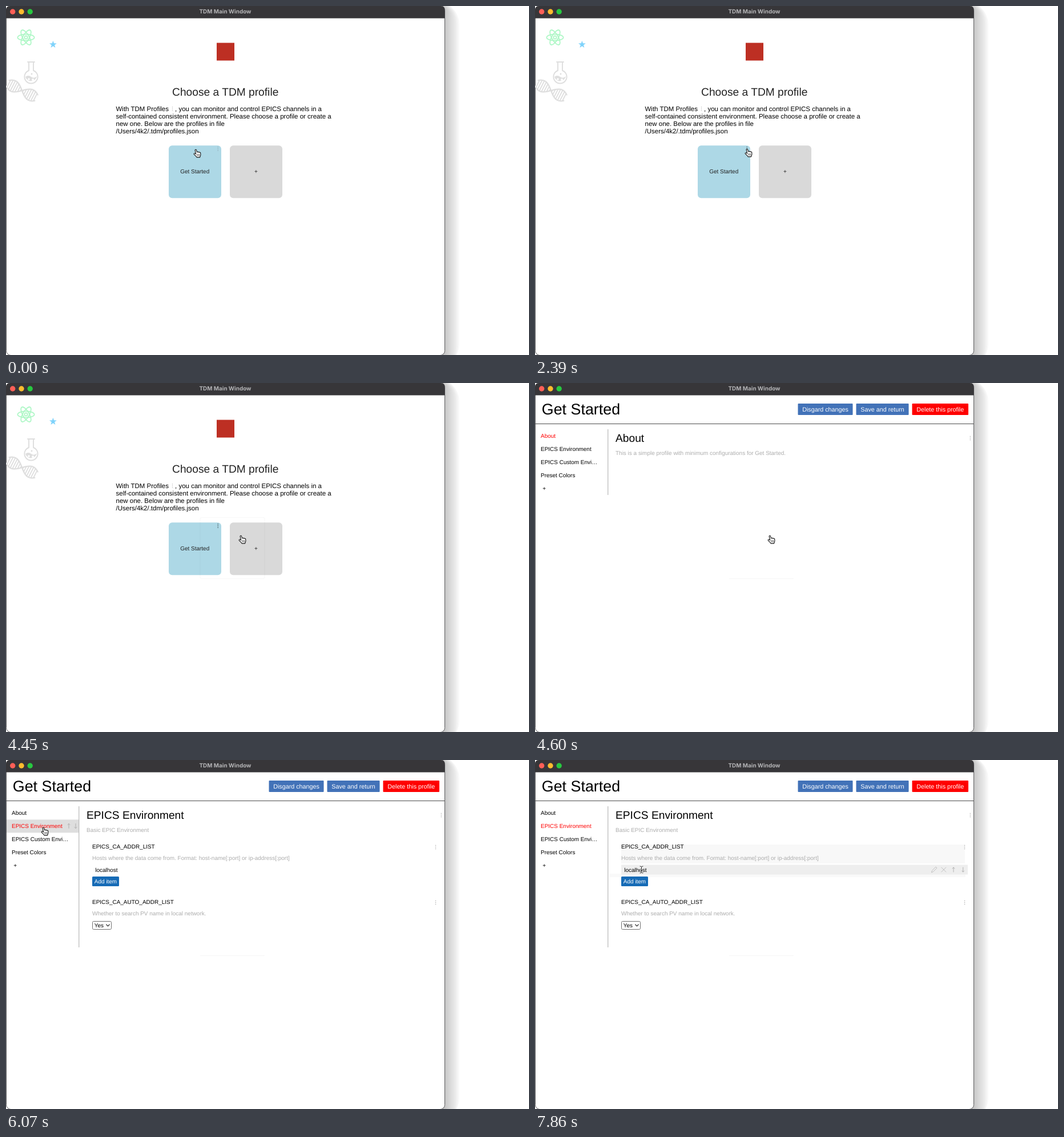
An HTML page that plays this animation: 916 by 611 pixels, repeating every 8 s.

```html
<!DOCTYPE html>
<html lang="en">
<head>
<meta charset="utf-8">
<title>TDM Main Window</title>
<style>
  html, body { margin: 0; width: 100%; height: 100%; overflow: hidden; background: #fff; }
  svg { display: block; width: 916px; height: 611px; }
  text { font-family: "Liberation Sans", Arial, sans-serif; font-size: 9.97px; text-rendering: geometricPrecision; white-space: pre; }
  .h1 { font-size: 26.85px; }
  .h2 { font-size: 19.19px; }
  .body { font-size: 11.51px; }
  .btn { font-size: 10.74px; fill: #fff; }
  .hint { fill: #adadad; }
  .mac { font-family: Inter, Roboto, sans-serif; font-size: 9.5px; fill: #f2f2f2; }
  .title { font-size: 9.9px; font-weight: 700; fill: #b4b4b6; }
  .mid { text-anchor: middle; }
  .line { fill: none; stroke-linecap: round; stroke-linejoin: round; }
</style>
</head>
<body>
<svg id="stage" viewBox="0 0 916 611" xmlns="http://www.w3.org/2000/svg"></svg>
<script>
const LOOP = 8000;

const text = (x, y, s, cls = '', more = '') => `<text x="${x}" y="${y}" class="${cls}" ${more}>${s}</text>`;
const rect = (x, y, w, h, fill, rx = 0, more = '') =>
  `<rect x="${x}" y="${y}" width="${w}" height="${h}" rx="${rx}" fill="${fill}" ${more}/>`;
const circle = (x, y, r, fill) => `<circle cx="${x}" cy="${y}" r="${r}" fill="${fill}"/>`;
const line = (d, color, w = 1, more = '') => `<path class="line" d="${d}" stroke="${color}" stroke-width="${w}" ${more}/>`;
const dots = (x, y, fill) => [-3, 0, 3].map(d => circle(x, y + d, .75, fill)).join('');
const group = (id, body, more = '') => `<g id="${id}" ${more}>${body}</g>`;
const range = n => [...Array(n).keys()];

const shadow = () => range(9).map(k =>
  rect(600, -2 - k * .75, 170.5 + k * 3 - 0.5, 640, '#000', 10 + k * 3.75, 'opacity=".026"')).join('');

const atom = () => [0, 60, 120].map(a =>
  `<ellipse rx="14.6" ry="5.6" transform="translate(35 55) rotate(${a})" fill="none" stroke="#aef7c6" stroke-width="1.8"/>`).join('') +
  `<circle cx="35" cy="55" r="2.6" fill="none" stroke="#aef7c6" stroke-width="1.8"/>`;

const star = () => `<path fill="#7fd3fb" d="M${range(10).map(i => {
  const a = i * Math.PI / 5 - Math.PI / 2, r = i % 2 ? 2.7 : 6.8;
  return (82.4 + r * Math.cos(a)).toFixed(2) + ' ' + (67.5 + r * Math.sin(a)).toFixed(2);
}).join('L')}Z"/>`;

const flask = () =>
  line('M38 98H50M40 98.500V113A11.600 11.600 0 1 0 48 113V98.500', '#dedede', 1.9) +
  `<path d="M34 124Q39 120 44 124T54 123A10.300 10.300 0 0 1 34 124Z" fill="#dedede"/>` +
  circle(40, 128, 1.8, '#fff') + circle(47, 129, 2, '#fff') + circle(45, 119, 1.4, '#dedede');

const dna = () => {
  const y = x => 10 * Math.sin(x * Math.PI / 35);
  const strand = s => 'M' + range(29).map(i => `${i * 2 - 28} ${(s * y(i * 2 - 28)).toFixed(2)}`).join('L');
  const rungs = range(14).map(i => i * 4 - 26).map(x => `M${x} ${-y(x)}L${x} ${y(x)}`).join('');
  return `<g transform="translate(28 148) rotate(27)">` +
    line(strand(1), '#dedede', 2.2) + line(strand(-1), '#dedede', 2.2) + line(rungs, '#dedede', 1.8) + '</g>';
};

const arrow = (x, y, s) => line(`M${x} ${y - 4}V${y + 4}M${x - 2} ${y - 2 * s}L${x} ${y - 4 * s}L${x + 2} ${y - 2 * s}`, '#ababab', .9);
const arrows = (x1, x2, y) => arrow(x1, y, 1) + arrow(x2, y, -1);
const button = (x, w, fill, s) => rect(x, 36, w, 20, fill, 1) + text(x + w / 2, 49.6, s, 'btn mid');

const chooser = () =>
  atom() + star() + flask() + dna() +
  rect(369, 64.5, 31, 31, '#bd2f23') +
  text(384.2, 157, 'Choose a TDM profile', 'h2 mid', 'fill="#222"') +
  text(192.5, 183.6, 'With TDM Profiles', 'body') + dots(291.5, 180, '#bbb') +
  text(296, 183.6, ', you can monitor and control EPICS channels in a', 'body') +
  ['self-contained consistent environment. Please choose a profile or create a',
   'new one. Below are the profiles in file',
   '/Users/4k2/.tdm/profiles.json'].map((s, i) => text(192.5, 196.6 + i * 13, s, 'body')).join('') +
  rect(285, 244.3, 92, 92, '#add8e6', 6) + rect(392, 244.3, 92, 92, '#d9d9d9', 6) +
  text(330.7, 293.3, 'Get Started', 'mid', 'fill="#222"') + text(438, 293.3, '+', 'mid', 'fill="#222"') +
  group('dotsDim', dots(371.2, 250, '#8fa9b3')) + group('dotsOn', dots(371.2, 250, '#2c3a40'));

const menu = () =>
  rect(354, 239.500, 86, 93, '#555c5e', 5, 'stroke="#8b8f90" stroke-width="1" style="filter:drop-shadow(0 3px 6px rgba(0,0,0,.38))"') +
  `<rect id="pick" x="358" y="261" width="78" height="17" rx="3" fill="#4285ec"/>` +
  line('M363 253L365.300 255.700L369.300 249.500', '#f2f2f2', 1.2) + dots(375.4, 253, '#d4d8da') +
  ['Edit', 'Move Up', 'Move Down', 'Clone'].map((s, i) => text(373, 272.8 + i * 17, s, 'mac')).join('');

const ITEMS = ['About', 'EPICS Environment', 'EPICS Custom Envi…', 'Preset Colors'];
const editor = () =>
  text(11.8, 55.3, 'Get Started', 'h1') +
  button(460.5, 96, '#4272b8', 'Disgard changes') + button(562.5, 92, '#4272b8', 'Save and return') +
  button(660.5, 98.5, '#fe0000', 'Delete this profile') +
  rect(1, 71, 767, 1, '#4c4c4c') +
  `<rect id="hover" x="1" width="126.500" height="23" fill="#dedede"/>` +
  ITEMS.map((s, i) => text(10, 96.4 + i * 23, s, '', `id="item${i}"`)).join('') + text(13.3, 188.4, '+') +
  group('sideArrows', arrows(110, 122, 0)) +
  `<rect id="rule" x="127.300" y="81" width="1" fill="#aaa"/>` + dots(762.3, 96.5, '#a8a8a8');

const about = () => text(141, 103, 'About', 'h2') +
  text(141, 126, 'This is a simple profile with minimum configurations for Get Started.', 'hint');

const section = (y, name, hint) => text(151, y, name) + text(151, y + 19.5, hint, 'hint') + dots(752.5, y - 3, '#a8a8a8');
const env = () =>
  group('rowHover', rect(151, 148, 602, 33, '#f8f8f8') + rect(130, 199, 624, 6, '#f9f9f9') + rect(151, 183.5, 607, 17, '#eeeeee') +
    line('M694.500 196.500L695.500 193.500L702 187L704 189L697.500 195.500ZM711.800 188L719.800 196M719.800 188L711.800 196', '#bdbdbd', .9) +
    arrows(733, 749.7, 192)) +
  text(141, 103, 'EPICS Environment', 'h2') + text(141, 126, 'Basic EPIC Environment', 'hint') +
  section(155.4, 'EPICS_CA_ADDR_LIST', 'Hosts where the data come from. Format: host-name[:port] or ip-address[:port]') +
  text(156.2, 195.5, 'localhost') +
  rect(151, 204, 47, 17, '#166bb6', 1.5) + text(174.5, 216, 'Add item', 'mid', 'fill="#fff"') +
  section(252.4, 'EPICS_CA_AUTO_ADDR_LIST', 'Whether to search PV name in local network.') +
  rect(151.5, 282.5, 33, 14, '#fff', 2, 'stroke="#707070"') + text(154.8, 293, 'Yes') +
  line('M175.800 288L178.500 290.800L181.200 288', '#222', 1.1);

const pointers = () =>
  group('hand',
    `<path d="M-3.900-5.600C-3.900-7-1.900-7.200-1.500-5.800L-.5-2.200C.2-3 1.400-2.900 1.700-2C2.300-2.700 3.500-2.500 3.800-1.600C4.600-2.100 5.600-1.600 5.700-.6L5.900 2C6 4 4.800 5 4.600 6.900L-1 6.900C-1.800 5-4 3.600-5.600 1.600C-6.300 .4-5-.7-3.800 .1L-2.400 1.200Z" fill="#fff" stroke="#111" stroke-width="1.100" stroke-linejoin="round"/>` +
    line('M-.2 1.500V4.300M1.700 1.500V4.300M3.600 1.500V4.300', '#222', .7)) +
  group('tip', '<path d="M-3-7V4.500L-.4 2.200L1.300 6L3.100 5.200L1.400 1.500H5Z" fill="#111" stroke="#fff" stroke-width=".9"/>') +
  group('beam', line('M-2.500-6Q0-6 0-4.500Q0-6 2.500-6M0-4.500V4.500M-2.500 6Q0 6 0 4.500Q0 6 2.500 6M-1.300 1.500H1.300', '#fff', 2.2, 'opacity=".7"') +
    line('M-2.500-6Q0-6 0-4.500Q0-6 2.500-6M0-4.500V4.500M-2.500 6Q0 6 0 4.500Q0 6 2.500 6M-1.300 1.500H1.300', '#222', 1));

const stage = document.getElementById('stage');
stage.innerHTML =
  shadow() +
  rect(.5, -.5, 768, 612, '#fff', 8, 'stroke="#58585a"') +
  '<path d="M0 21.500V7Q0 0 7 0H761.500Q768.500 0 768.500 7V21.500Z" fill="#373639"/>' +
  circle(11.7, 10, 4.7, '#ff5f57') + circle(27, 10, 4.7, '#febc2e') + circle(42.2, 10, 4.7, '#28c840') +
  text(384, 13.2, 'TDM Main Window', 'mac title mid') +
  group('chooser', chooser()) +
  group('residue', rect(340, 235.5, 113, 107, 'none', 3, 'stroke="#000" stroke-opacity=".025" stroke-width="1.500"')) +
  group('editor', editor()) + group('about', about()) + group('env', env()) +
  group('trace', rect(340, 342, 113, 1, '#f6f6f6')) +
  group('menu', menu()) + group('cursor', pointers());

const el = {};
stage.querySelectorAll('[id]').forEach(n => el[n.id] = n);
const show = (id, on) => el[id].setAttribute('visibility', on ? 'inherit' : 'hidden');
const set = (id, k, v) => el[id].setAttribute(k, v);

const MOVES = [
  [1500, 2390, [[338, 260], [346, 263], [355, 264], [363, 262], [370, 259], [375, 257], [374, 257]]],
  [2830, 3860, [[374, 257], [374, 257], [374, 257], [375, 258], [379, 260], [390, 265], [405, 271], [414, 274]]],
  [4890, 5770, [[405, 268], [310, 222], [190, 172], [112, 146], [75, 134], [70, 128], [68, 125]]],
  [6070, 6970, [[68, 125], [72, 129], [88, 141], [116, 158], [150, 177], [178, 190], [185.5, 191]]],
  [7420, 7860, [[185.5, 191.5], [186, 191.5], [186, 192], [186.5, 192]]]
];

function cursorAt(t) {
  let p = [335, 258];
  for (const [a, b, pts] of MOVES) {
    if (t < a - 1) break;
    const n = pts.length - 1;
    p = pts[Math.min(n, Math.max(0, Math.floor((t - a) / (b - a) * n + .03)))];
  }
  return p;
}

function draw(t) {
  const [x, y] = cursorAt(t), hotY = y - 6;
  const editing = t >= 4595, inEnv = t >= 6065, menuOn = t >= 2825 && t < 4445;

  show('chooser', !editing);
  show('dotsOn', x > 367 && !editing);
  show('dotsDim', x <= 367);
  show('residue', t >= 4445 && !editing);
  show('trace', editing);

  show('menu', menuOn);
  set('menu', 'opacity', t >= 4295 ? .55 : 1);
  show('pick', menuOn && !(t >= 4155 && t < 4295));
  set('pick', 'y', hotY < 261 ? 244 : 261);

  show('editor', editing);
  show('about', editing && !inEnv);
  show('env', inEnv);
  set('rule', 'height', inEnv ? 247 : 115);

  const row = editing && x < 128 ? Math.floor((hotY - 81) / 23) : -1;
  const rowOn = row >= 0 && row < 4;
  show('hover', rowOn);
  show('sideArrows', rowOn);
  if (rowOn) {
    set('hover', 'y', 81.3 + row * 23);
    set('sideArrows', 'transform', `translate(0 ${93 + row * 23 - .5})`);
  }
  ITEMS.forEach((s, i) => set('item' + i, 'fill', i === (inEnv ? 1 : 0) ? '#f00' : '#000'));
  el.item2.textContent = row === 2 ? 'EPICS Custom En…' : ITEMS[2];

  const overRow = inEnv && x > 151 && y > 184;
  const plain = t >= 4885 && x > 128 && !overRow;
  show('rowHover', overRow);
  show('beam', overRow);
  show('tip', plain);
  show('hand', !overRow && !plain);
  set('cursor', 'transform', `translate(${x} ${y})`);
}

function tick(now) {
  draw(now % LOOP);
  requestAnimationFrame(tick);
}
draw(0);
requestAnimationFrame(tick);
</script>
</body>
</html>
```
